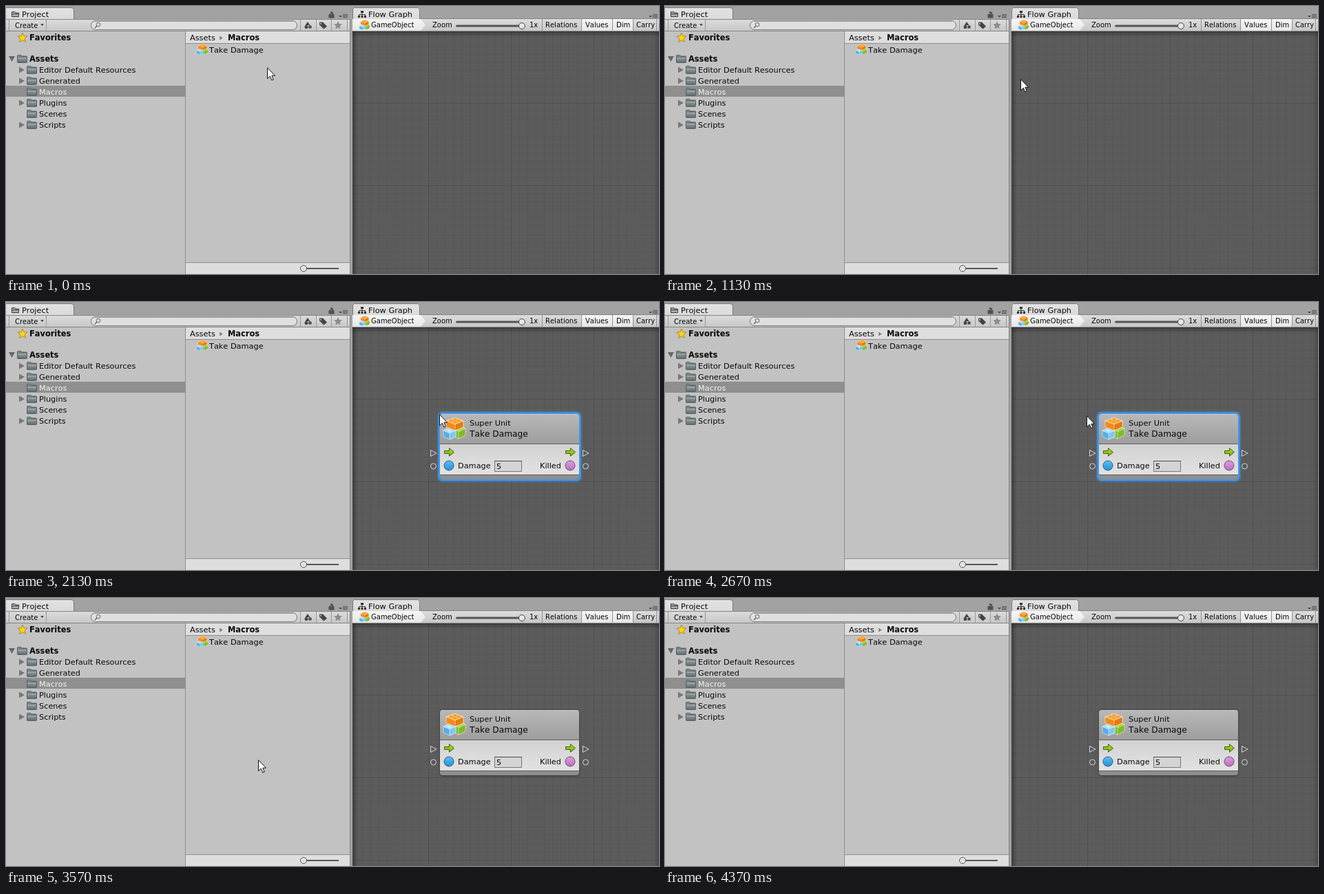
An HTML page that plays this animation: 948x390 px, repeating every 4930 ms.

```html
<!DOCTYPE html>
<html lang="en">
<head>
<meta charset="utf-8">
<title>Drag a macro into the graph</title>
<style>
html, body { margin: 0; width: 100%; height: 100%; overflow: hidden; background: #a2a2a2; }
svg { display: block; width: 948px; height: 390px; }
text { font-family: "DejaVu Sans", sans-serif; font-size: 11.3px; font-kerning: none; fill: #080808; white-space: pre; }
.b { font-weight: bold; font-size: 11.4px; }
.s { font-size: 10px; }
.t { font-size: 12.2px; }
.w { fill: #f4f4f4; }
</style>
</head>
<body>
<svg id="stage" viewBox="0 0 948 390" xmlns="http://www.w3.org/2000/svg">
<defs>
  <linearGradient id="bar" x2="0" y2="1"><stop stop-color="#dcdcdc"/><stop offset="1" stop-color="#c6c6c6"/></linearGradient>
  <linearGradient id="on" x2="0" y2="1"><stop stop-color="#f6f6f6"/><stop offset="1" stop-color="#e6e6e6"/></linearGradient>
  <linearGradient id="tab" x2="0" y2="1"><stop stop-color="#e2e2e2"/><stop offset="1" stop-color="#dadada"/></linearGradient>
  <linearGradient id="head" x2="0" y2="1"><stop stop-color="#b8b8b8"/><stop offset="1" stop-color="#9d9d9d"/></linearGradient>
  <linearGradient id="card" x2="0" y2="1"><stop stop-color="#d2d2d2"/><stop offset="1" stop-color="#e2e2e2"/></linearGradient>
  <linearGradient id="fold" x2="0" y2="1"><stop stop-color="#98a2a4"/><stop offset="1" stop-color="#5e6a6c"/></linearGradient>
  <linearGradient id="leaf" x2="0" y2="1"><stop stop-color="#b4e02c"/><stop offset="1" stop-color="#74ae0c"/></linearGradient>
  <linearGradient id="blue" x2="0" y2="1"><stop stop-color="#5cc0f4"/><stop offset="1" stop-color="#2990d4"/></linearGradient>
  <linearGradient id="pink" x2="0" y2="1"><stop stop-color="#dca0dc"/><stop offset="1" stop-color="#b96fbd"/></linearGradient>
  <linearGradient id="shadeY" x2="0" y2="1"><stop stop-opacity=".38"/><stop offset="1" stop-opacity="0"/></linearGradient>
  <linearGradient id="shadeX"><stop stop-opacity=".32"/><stop offset="1" stop-opacity="0"/></linearGradient>
  <pattern id="minor" x="505" y="45" width="12" height="12" patternUnits="userSpaceOnUse"><path d="M.5 0V12M0 .5H12" stroke="#575757"/></pattern>
  <pattern id="major" x="493" y="21" width="120" height="120" patternUnits="userSpaceOnUse"><path d="M.5 0V120M0 .5H120" stroke="#505050"/></pattern>
  <filter id="soft" x="-10%" y="-10%" width="120%" height="120%"><feGaussianBlur stdDeviation="1"/></filter>
  <symbol id="cubes" viewBox="0 0 32 32" overflow="visible">
    <g stroke="#fff" stroke-width=".5" stroke-linejoin="round">
      <path d="M16 17L24 12.5L32 16V26L22 31L16 28Z" fill="#7fba2c"/><path d="M16 17L24 13L32 16L22 21Z" fill="#a6d84c"/><path d="M22 21V31" fill="none"/>
      <path d="M0 19L9 15L18 19V28L9 32L0 28Z" fill="#56aee6"/><path d="M0 19L9 15L18 19L9 23Z" fill="#a8dcfa"/><path d="M9 23L18 19V28L9 32Z" fill="#7cc6f2"/>
      <path d="M4 5L17 .5L29 5V14L17 19L4 14Z" fill="#f08a1c"/><path d="M4 5L17 .5L29 5L17 10Z" fill="#fab44c"/><path d="M17 10L29 5V14L17 19Z" fill="#e57a12"/>
    </g>
    <g fill="#f39a30"><ellipse cx="11" cy="4.6" rx="2.6" ry="1.4"/><ellipse cx="17" cy="6.8" rx="2.6" ry="1.4"/><ellipse cx="17" cy="2.6" rx="2.6" ry="1.4"/><ellipse cx="23" cy="4.8" rx="2.6" ry="1.4"/></g>
    <path d="M5 19.2L9 17.4L13 19.2L9 21Z" fill="#d2eefc"/>
  </symbol>
  <g id="folder">
    <path d="M.5 11V2.5Q.5 1.5 1.5 1.5H5.5Q6.5 1.5 7 3H13.5Q14.5 3 14.5 4V11Z" fill="#808c8e" stroke="#556062"/>
    <rect x=".5" y="4.5" width="14" height="8" rx="1" fill="url(#fold)" stroke="#556062"/>
    <path d="M1.5 5.5H13.5" stroke="#b6bec0"/>
  </g>
  <path id="star" d="M0-7L2-2.4L7-2L3.2 1.4L4.4 6.4L0 3.7L-4.4 6.4L-3.2 1.4L-7-2L-2-2.4Z"/>
  <path id="go" d="M.5 4.5H7.5V.7L14.5 6.5L7.5 12.3V8.5H.5Z" fill="url(#leaf)" stroke="#3f5e0c" stroke-linejoin="round"/>
  <g id="menu"><path d="M0 3H5L2.5 5.5Z" fill="#444"/><path d="M6 1.5H13M6 3.5H13M6 5.5H13" stroke="#505050"/></g>
</defs>

<g id="project">
  <rect width="500" height="390" fill="#a2a2a2"/>
  <rect y="19" width="499" height="18" fill="url(#bar)"/>
  <path d="M0 19.5H499M0 36.5H499" stroke="#858585"/>
  <path d="M0 2.5H95Q98.5 2.5 98.5 6V19H0Z" fill="url(#tab)"/>
  <path d="M0 2.5H95Q98.5 2.5 98.5 6V19" fill="none" stroke="#787878"/>
  <path d="M8.5 15.5V8.5H13L14 10H18.5V15.5ZM8.5 11.5H18" fill="#aaa" stroke="#3c3c3c"/>
  <path d="M469 12H476V17H469ZM474.5 12V10.5Q474.5 8.5 472.5 8.5Q471 8.5 470.8 10" fill="#505050" stroke="#505050"/>
  <use href="#menu" x="483" y="11"/>
  <path d="M4.5 20V36M58.5 20V36M427.5 20V36M450.5 20V36M472.5 20V36M495.5 20V36" stroke="#999"/>
  <path d="M50 26H55L52.5 29Z" fill="#444"/>
  <rect x="123.5" y="21.5" width="299" height="13" rx="6.5" fill="#dfdfdf" stroke="#767676"/>
  <path d="M128 22.5H418" stroke="#b4b4b4"/>
  <g fill="none" stroke="#666"><circle cx="134" cy="27" r="2.8"/><path d="M132 29L129 32" stroke-width="1.5"/></g>
  <g fill="#444"><path d="M438 23L441.5 28H434.5Z"/><circle cx="436" cy="30.5" r="2.5"/><rect x="439.5" y="28.5" width="4" height="4"/>
  <path d="M455 23.5H460L466 29.5L461.5 33.5L455 27.5Z"/></g><circle cx="457" cy="25.7" r="1" fill="#ddd"/>
  <use href="#star" transform="translate(482 28) scale(.85)" fill="#8c8c8c"/>
  <rect y="37" width="499" height="353" fill="#c2c2c2"/>
  <rect y="116" width="260" height="16" fill="#8f8f8f"/>
  <use href="#star" x="24" y="46" fill="#fbd21c" stroke="#b08a20"/>
  <rect x="261" y="37" width="238" height="17" fill="#dedede"/>
  <path d="M310 43.5L315 46.5L310 49.5Z" fill="#858585"/>
  <rect x="261" y="374" width="238" height="16" fill="#dedede"/>
  <path d="M261 54.5H499M261 373.5H499M260.5 37V390" stroke="#8e8e8e"/>
  <path d="M432 382H483" stroke="#555" stroke-width="2"/>
  <circle cx="432" cy="382" r="4.5" fill="#e4e4e4" stroke="#555"/>
  <rect id="row" x="261" y="56" width="238" height="16" fill="#3e7de7"/>
  <use href="#cubes" x="277" y="55" width="16" height="16"/>
</g>

<g id="graph">
  <rect x="499" width="449" height="390" fill="#a2a2a2"/>
  <path d="M499.5 19V390" stroke="#868686"/>
  <rect x="503" y="19" width="445" height="18" fill="url(#bar)"/>
  <path d="M503 18.5H948" stroke="#858585"/>
  <path d="M503 19V6Q503 2.5 506 2.5H597Q600.5 2.5 600.5 6V19Z" fill="url(#tab)"/>
  <path d="M503.5 19V6Q503.5 2.5 506 2.5H597Q600.5 2.5 600.5 6V19" fill="none" stroke="#787878"/>
  <path d="M515 7H519V10H515ZM511 14H514V17H511ZM515.5 14H518.5V17H515.5ZM520 14H523V17H520Z" fill="#333"/>
  <path d="M517 10V14M512.5 14V12.5H521.5V14" fill="none" stroke="#333"/>
  <use href="#menu" x="933" y="11"/>
  <path d="M503 19H602L609 27.5L602 36H503Z" fill="url(#on)"/>
  <path d="M835 19H910V36H835Z" fill="url(#on)"/>
  <path d="M778.5 19V36M835.5 19V36M880.5 19V36M910.5 19V36M944.5 19V36" stroke="#929292"/>
  <use href="#cubes" x="513" y="20" width="15" height="15"/>
  <path d="M654.5 29H750" stroke="#555" stroke-width="3" stroke-linecap="round"/>
  <circle cx="749" cy="29" r="4.5" fill="#e6e6e6" stroke="#444"/>
  <rect x="503" y="36" width="445" height="354" fill="#5c5c5c"/>
  <rect x="503" y="36" width="445" height="354" fill="url(#minor)"/>
  <rect x="503" y="36" width="445" height="354" fill="url(#major)"/>
  <rect x="503" y="36" width="445" height="9" fill="url(#shadeY)"/>
  <rect x="503" y="36" width="8" height="354" fill="url(#shadeX)"/>
  <rect x="503" y="36" width="8" height="354" fill="url(#shadeX)" opacity=".6" transform="matrix(-1 0 0 1 1451 0)"/>
  <path d="M503 36.5H948" stroke="#858585"/>
</g>

<g id="node">
  <rect x="629.5" y="162.5" width="203" height="97" rx="5" fill="#222" opacity=".6" filter="url(#soft)"/>
  <g id="glow" fill="none" stroke="#3f97ea">
    <rect x="628.5" y="161.5" width="205" height="98" rx="5" stroke-width="3" filter="url(#soft)"/>
    <rect x="629" y="162" width="204" height="97" rx="4.5" stroke-width="2"/>
  </g>
  <rect x="630" y="163" width="202" height="95" rx="4" fill="#8e8e8e"/>
  <path d="M630 207V167Q630 163 634 163H828Q832 163 832 167V207Z" fill="url(#head)"/>
  <path d="M633 163.5H829" stroke="#cacaca"/>
  <rect x="630" y="207" width="202" height="44" fill="url(#card)"/>
  <path d="M630 206.5H832M630 251.5H832" stroke="#606060"/>
  <use href="#cubes" x="635" y="168" width="32" height="32"/>
  <use href="#go" x="636" y="212"/><use href="#go" x="812" y="212"/>
  <circle cx="643" cy="238" r="7" fill="url(#blue)" stroke="#1d5f94"/>
  <circle cx="819" cy="238" r="7" fill="url(#pink)" stroke="#75427a"/>
  <rect x="709.5" y="231.5" width="39" height="15" fill="#d4d4d4" stroke="#777"/><path d="M709 231.5H749" stroke="#4c4c4c"/>
  <g fill="none" stroke="#d4d4d4">
    <path d="M616.5 215.5L625 220L616.5 224.5ZM837.5 215.5L846 220L837.5 224.5Z"/>
    <circle cx="620.5" cy="239" r="4"/><circle cx="841.5" cy="239" r="4"/>
  </g>
</g>
<circle id="dot" cx="580" cy="169" r="2" fill="#d8ecff" stroke="#3f97ea"/>
<g id="cursor">
  <g id="badge">
    <path d="M3.5 15.5H14.5V24.5H3.5Z" fill="none" stroke="#ddd" stroke-dasharray="1 1"/>
    <rect x="10.5" y="20.5" width="10" height="10" fill="#fff" stroke="#000"/><path d="M13 25.5H18M15.5 23V28" stroke="#000"/>
  </g>
  <path d="M.5 .8V16.8L4.3 13.2L6.8 19L9.2 18L6.8 12.3H11.5Z" fill="#fff" stroke="#111"/>
</g>
</svg>
<script>
const NS = "http://www.w3.org/2000/svg";
const el = id => document.getElementById(id);

function make(tag, attrs, parent, text = "") {
  const e = document.createElementNS(NS, tag);
  for (const k in attrs) e.setAttribute(k, attrs[k]);
  e.textContent = text;
  return parent.appendChild(e);
}
const label = (parent, x, y, text, cls = "") => make("text", { x, y, class: cls }, el(parent), text);

// Project tree: name, has children, selected
[["Editor Default Resources", 1], ["Generated", 1], ["Macros", 0, 1], ["Plugins", 1], ["Scenes", 0], ["Scripts", 1]]
  .forEach(([name, open, picked], i) => {
    const y = 93 + i * 16;
    if (open) make("path", { d: `M19 ${y - 4.5}L27 ${y}L19 ${y + 4.5}Z`, fill: "#777" }, el("project"));
    make("use", { href: "#folder", x: 30, y: y - 7 }, el("project"));
    label("project", 48, y + 4, name, picked ? "w" : "");
  });
make("path", { d: "M4 73H13L8.5 81Z", fill: "#666" }, el("project"));
make("use", { href: "#folder", x: 16, y: 70 }, el("project"));
label("project", 34, 50, "Favorites", "b");
label("project", 34, 81, "Assets", "b");
label("project", 23, 16, "Project");
label("project", 13, 32, "Create", "s");
label("project", 267, 50, "Assets");
label("project", 322, 50, "Macros", "b");
const item = label("project", 295, 68, "Take Damage");

label("graph", 526, 16, "Flow Graph");
[[530, "GameObject"], [619, "Zoom"], [760, "1x"], [783, "Relations"], [841, "Values"], [886, "Dim"], [915, "Carry"]]
  .forEach(([x, name]) => label("graph", x, 31, name, "s"));

label("node", 673, 180, "Super Unit");
label("node", 673, 196, "Take Damage", "t");
label("node", 656, 242, "Damage");
label("node", 712, 243, "5");
label("node", 775, 242, "Killed");

const ease = {
  line: u => u,
  in: u => u * u,
  out: u => 1 - (1 - u) ** 2,
  both: u => u * u * (3 - 2 * u),
  glide: u => .35 * u + .65 * u * u * (3 - 2 * u)
};

// Pointer path: time, x, y, easing towards that point
const path = [
  [0, 379, 89], [30, 379, 89], [470, 366, 65, "both"], [790, 366, 65],
  [1130, 516, 106, "in"], [1600, 600, 151, "out"], [1670, 608, 154, "line"], [1800, 629, 163, "out"],
  [2500, 629, 163], [2930, 580, 168, "both"], [3230, 580, 168],
  [3570, 366, 235, "glide"], [3600, 352, 241, "line"], [4130, 94, 351, "glide"], [4370, 63, 392, "line"]
];

function pointer(t) {
  const i = path.findIndex(p => p[0] > t);
  if (i < 0) return [63, 400];
  const [t0, x0, y0] = path[i - 1], [t1, x1, y1, kind = "line"] = path[i];
  const u = ease[kind]((t - t0) / (t1 - t0));
  return [x0 + (x1 - x0) * u, y0 + (y1 - y0) * u].map(Math.round);
}

const LOOP = 4930;
const show = (id, on) => { el(id).style.display = on ? "" : "none"; };

function draw(t) {
  const dragging = t >= 570 && t < 1100;
  show("row", dragging);
  item.setAttribute("class", dragging ? "w" : "");
  show("badge", t >= 1150 && t < 2000);
  show("node", t >= 2130);
  show("glow", t < 3100);
  show("dot", t >= 3100 && t < 3200);
  show("cursor", t < 4370);
  el("cursor").setAttribute("transform", `translate(${pointer(t)})`);
}

let start;
function tick(now) {
  start ??= now;
  draw((now - start) % LOOP);
  requestAnimationFrame(tick);
}
draw(0);
requestAnimationFrame(tick);
</script>
</body>
</html>
```
